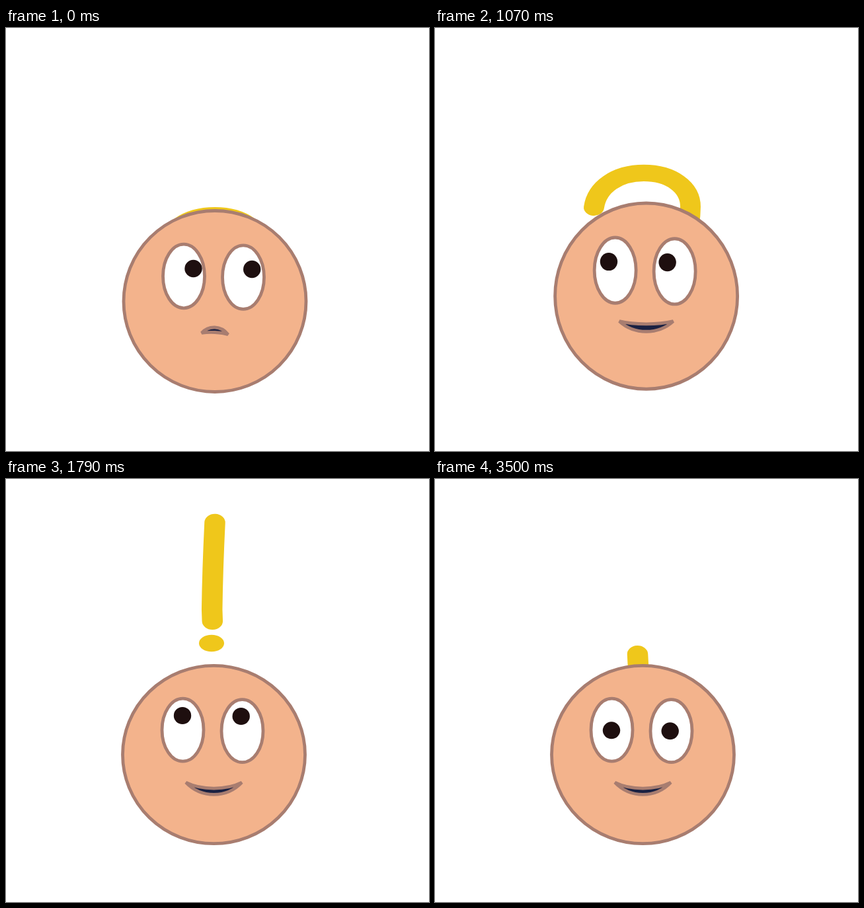
An HTML page with a canvas for the animation above (3570 ms loop, 640 by 640 pixels).

```html
<!DOCTYPE html>
<html lang="en">
<head>
<meta charset="utf-8">
<title>Question and answer</title>
<style>
html, body { margin: 0; height: 100%; overflow: hidden; background: #fff; }
canvas { display: block; }
</style>
</head>
<body>
<canvas id="stage" width="640" height="640"></canvas>
<script>
const ctx = document.getElementById('stage').getContext('2d');
const LOOP = 3570, FPS = 14, STEPS = 50, ANSWER = 24;
const SKIN = '#f3b38c', LINE = '#a87d70', GOLD = '#efc71b', PUPIL = '#1e0f0f', MOUTH = '#1a2142';

const ramp = (n, from, to) => Math.min(1, Math.max(0, (n - from) / (to - from)));
const easeOut = (p, power) => 1 - (1 - p) ** power;
const easeInOut = p => (1 - Math.cos(Math.PI * p)) / 2;

function oval(x, y, rx, ry, fill, stroke) {
  ctx.beginPath();
  ctx.ellipse(x, y, rx, ry, 0, 0, 7);
  ctx.fillStyle = fill;
  ctx.fill();
  if (stroke) ctx.stroke();
}

// The brush is wider than it is high
function brush() {
  ctx.scale(1, .83);
  ctx.lineWidth = 31.5;
  ctx.lineCap = ctx.lineJoin = 'round';
  ctx.strokeStyle = GOLD;
  ctx.stroke();
}

function question(n) {
  const launch = easeOut(ramp(n, 17, 23), 2.13);
  const top = 271 - 48.5 * easeOut(ramp(n, 0, 12), 1.25) - 34 * ramp(n, 12, 17) ** 1.5 - 177 * launch;
  ctx.save();
  ctx.translate(313.5, top);
  ctx.scale(.98 + .02 * launch, .965 + .035 * launch);
  oval(-.5, 250.7, 19, 12.7, GOLD);
  ctx.beginPath();
  ctx.moveTo(-74.5, 67);
  ctx.bezierCurveTo(-70, 35, -39, 13.2, 2.5, 13.2);
  ctx.bezierCurveTo(44, 13.2, 74.5, 35, 74.5, 66);
  ctx.bezierCurveTo(74.5, 102, 63, 131, 38.5, 149);
  ctx.bezierCurveTo(12, 167, -3.5, 175, -3.5, 194);
  ctx.quadraticCurveTo(-3.5, 203, 0, 213);
  brush();
  ctx.restore();
}

function bang(n) {
  const drift = easeOut(ramp(n, 25, 49), 1.8);
  const top = 53 + 71.3 * ramp(n, 25, 40) + 128 * easeInOut(ramp(n, 40, 49));
  const foot = 2 * drift - 4, len = 149.5 - 5 * drift;
  ctx.save();
  ctx.translate(316 - 9.5 * drift, top);
  oval(foot - 1, len + 46, 19, 12.8, GOLD);
  ctx.beginPath();
  ctx.moveTo(0, 12.8);
  ctx.quadraticCurveTo(8 * drift - 3.5, 85, foot - .3, len - 5);
  ctx.lineTo(foot + .3, len + 12.5);
  brush();
  ctx.restore();
}

// Lips meet at the corners; up and low are how far each one sags
function mouth(w, y, up, low, tilt) {
  const bow = (from, to, sag) => ctx.bezierCurveTo(
    from * w * .45, y + sag * 4 / 3, to * w * .45, y + sag * 4 / 3, to * w, y + to * tilt);
  ctx.beginPath();
  ctx.moveTo(-w, y - tilt);
  bow(-1, 1, up);
  bow(1, -1, low);
  ctx.closePath();
  ctx.fillStyle = MOUTH;
  ctx.fill();
  ctx.stroke();
}

function face(n) {
  const ponder = ramp(n, 0, 12), squash = ramp(n, 8, 12);
  const hop = Math.sin(ramp(n, 12, 17) * Math.PI / 2);
  const land = ramp(n, 17, 21), know = ramp(n, 21, 25);
  const lower = easeOut(ramp(n, 25, 42), 1.55);
  const gazeX = -32.5 - 25 * ponder + hop + 10 * land - know;
  const gazeY = -49.5 - 1.5 * hop - 13 * land + 4 * know + 22.7 * lower;

  ctx.save();
  ctx.translate(316 + 4.5 * hop - 6 * land, 413.5 + 7.5 * squash - 19 * hop + 15 * land);
  ctx.scale(1, 1 + (-8.5 * squash + 15 * hop - 8.8 * land) / 137);
  ctx.strokeStyle = LINE;
  ctx.lineWidth = 4.8;
  ctx.lineJoin = 'bevel';
  oval(0, 0, 138, 137, SKIN, true);
  for (const side of [0, 1]) {
    oval(-47 + 90 * side, -38 + 1.6 * side, 31.5, 48.3, '#fff', true);
    oval(gazeX + 88.7 * side, gazeY + side, 13.2, 13.2, PUPIL);
  }
  mouth(
    20 + 5 * ponder + 19.5 * hop - 1.5 * land - .7 * know,
    49 - 3 * ponder - 11 * hop + 6.3 * land + 1.6 * know,
    -9.5 + 7.5 * ponder + 7.5 * hop + 4.7 * land - 1.2 * know,
    -2 + 7 * ponder + 12.5 * hop - 1.2 * land + 2.3 * know,
    1.2 * (1 - ponder)
  );
  ctx.restore();
}

function draw() {
  const n = Math.floor(performance.now() % LOOP * FPS / 1000 + .08) % STEPS;
  ctx.clearRect(0, 0, 640, 640);
  (n < ANSWER ? question : bang)(n);
  face(n);
  requestAnimationFrame(draw);
}
draw();
</script>
</body>
</html>
```
